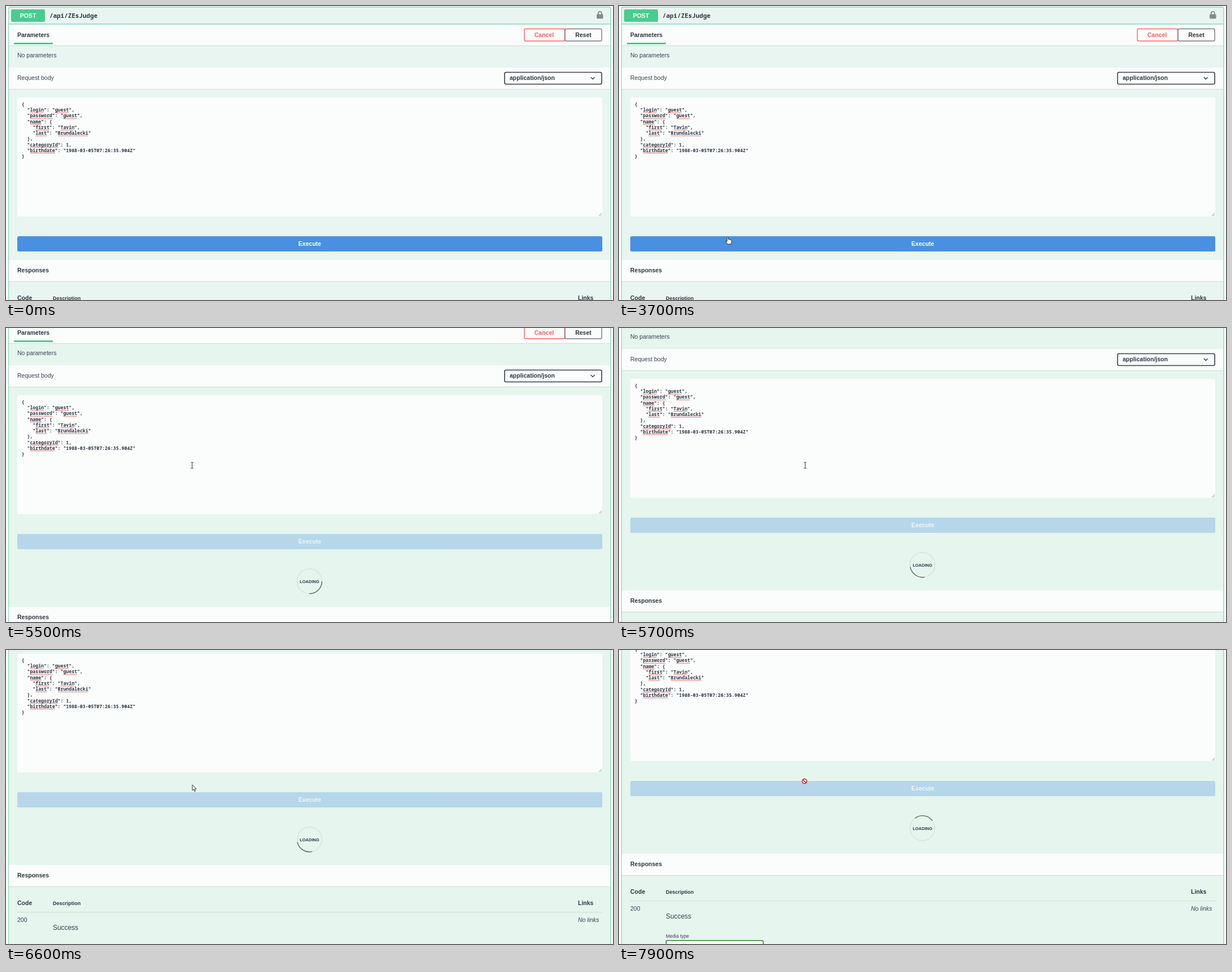
An HTML page for the animation above (8 s loop, 1075 px wide and 521 px high).

```html
<!DOCTYPE html>
<html lang="en">
<head>
<meta charset="utf-8">
<title>API console</title>
<style>
  html, body { margin: 0; width: 100%; height: 100%; overflow: hidden; background: #fff; }
  svg { display: block; width: 1075px; height: 521px; }
  text { font: 10.5px "Liberation Sans", Arial, sans-serif; fill: #3b4151; white-space: pre; }
  .b { font-weight: 700; fill: #303644; }
  .mid { text-anchor: middle; }
  .mono { font-family: "Noto Sans Mono", "DejaVu Sans Mono", monospace; font-weight: 600; fill: #303644; }
  .white { fill: #fff; }
  .panel { fill: #fafdfc; }
  .rule { stroke: #d0dad6; fill: none; }
  .edge { stroke: #8cdabb; stroke-width: 1.4; fill: none; }
  .wave { stroke: #e23a3a; stroke-width: .9; fill: none; }
</style>
</head>
<body>
<svg viewBox="0 0 1075 521">
  <g id="page">
    <rect id="back" x="4.5" y="2" width="1066.5" height="1000" rx="3"/>
    <rect class="panel" x="5" y="33" width="1065" height="37"/>
    <path class="rule" d="M5 70.5H1070"/>
    <rect class="edge" x="4.5" y="2" width="1066.5" height="1000" rx="3"/>
    <path class="edge" d="M5 32H1071"/>
    <rect x="9" y="6" width="60" height="22" rx="2.5" fill="#49cc90"/>
    <text class="b mid white" x="39" y="20.5">POST</text>
    <text class="mono" x="77" y="21" style="font-size:10.9px">/api/ZEsJudge</text>
    <rect x="1046" y="14.5" width="11.5" height="8" rx="1.4" fill="#858b89"/>
    <path d="M1048.8 15v-2.2a3 3 0 0 1 6 0v2.2" fill="none" stroke="#858b89" stroke-width="1.7"/>

    <text class="b" x="20" y="54.5">Parameters</text>
    <rect x="14" y="65" width="69" height="3" fill="#49cc90"/>
    <rect x="918" y="40.5" width="71.5" height="21.5" rx="2" fill="none" stroke="#ff6060" stroke-width="1.4"/>
    <text class="b mid" x="953" y="54.5" style="fill:#f95b5b">Cancel</text>
    <rect x="990" y="40.5" width="65" height="21.5" rx="2" fill="none" stroke="#767c84" stroke-width="1.4"/>
    <text class="b mid" x="1022.5" y="54.5">Reset</text>
    <text x="20" y="90.8">No parameters</text>

    <rect class="panel" x="5" y="109" width="1065" height="38"/>
    <path class="rule" d="M5 147.5H1070"/>
    <text x="20" y="131">Request body</text>
    <rect class="panel" x="883" y="117.5" width="172" height="21" rx="2.5" stroke="#363c4a" stroke-width="1.6"/>
    <text class="b" x="892" y="131">application/json</text>
    <path d="M1035.8 126.2l3.4 3.3 3.4-3.3" fill="none" stroke="#303644" stroke-width="1.4"/>

    <rect class="panel" x="20" y="162" width="1036" height="211" rx="2.5"/>
    <path d="M1050 372l5-5M1053 372l2-2" stroke="#858b89" stroke-width=".9"/>
    <g id="json"></g>

    <g id="run">
      <rect x="20" y="408" width="1036" height="27" rx="2.5" fill="#4990e2"/>
      <text class="b mid white" x="538" y="425">Execute</text>
    </g>

    <g id="load">
      <circle cx="537.5" cy="491.7" r="22" fill="none" stroke="#d6e4de" stroke-width="1.4"/>
      <path id="arc" d="M521.94 476.14a22 22 0 0 1 31.12 0" fill="none" stroke="#5c6763" stroke-width="1.4"/>
      <text class="b mid" x="537.5" y="494.5" style="font-size:7.5px">LOADING</text>
    </g>

    <g id="resp">
      <rect class="panel" x="5" y="450" width="1065" height="38"/>
      <path class="rule" d="M5 488.3H1070"/>
      <text class="b" x="20" y="472">Responses</text>
      <text class="b" x="20" y="521">Code</text>
      <text class="b" x="83" y="521" style="font-size:8.95px">Description</text>
      <text class="b" x="1013" y="521">Links</text>
      <path class="rule" d="M20 533.7H1056"/>
      <text x="20" y="551">200</text>
      <text x="1013" y="551" font-style="italic" style="font-style:italic">No links</text>
      <text x="83" y="564.5" style="font-size:11.9px">Success</text>
      <text x="83" y="599.3" style="font-size:8.4px">Media type</text>
      <rect class="panel" x="83.5" y="603.7" width="172" height="21" rx="2.5" stroke="#2c8a2c" stroke-width="1.6"/>
    </g>
  </g>

  <g id="cursor">
    <path id="arrow" d="M0 0V10.2L2.4 8 4 11.8 5.6 11.1 4 7.4H7.1Z" fill="#fff" stroke="#222" stroke-width=".9"/>
    <path id="beam" d="M-2.3-.8H-.6L0-.3.6-.8H2.3M0-.3V9.3M-2.3 9.8H-.6L0 9.3.6 9.8H2.3" fill="none" stroke="#333" stroke-width="1"/>
    <path id="hand" d="M-1 1Q0-.6 1 1V5L6 6Q7 6.3 7 7.5V10L5.5 13.5H-.5L-3.3 8.6Q-3.4 7.3-2.3 7.6L-1 8.8Z" fill="#fff" stroke="#222" stroke-width=".9"/>
    <g id="no" fill="#fff" stroke="#dd1111" stroke-width="1.5">
      <circle r="4.1"/><path d="M-2.9-2.9L2.9 2.9"/>
    </g>
  </g>
</svg>
<script>
const LOOP = 8000, STEP = 100, CLICK = 4300;
const $ = id => document.getElementById(id);
const set = (id, attrs) => {
  for (const k in attrs) $(id).setAttribute(k, attrs[k]);
};

const body = `{
  "login": "guest",
  "password": "guest",
  "name": {
    "first": "Tavin",
    "last": "Brundalecki"
  },
  "categoryId": 1,
  "birthdate": "1988-03-05T07:26:35.904Z"
}`;

// JSON text with a spelling mark under every quoted word
function buildJson() {
  const size = 8.2, cell = size * .6, left = 27.7;
  let out = '';
  body.split('\n').forEach((line, i) => {
    const y = 177 + i * 10.22;
    const indent = line.search(/\S/);
    out += `<text class="mono" style="font-size:${size}px" x="${left + indent * cell}" y="${y}">${line.trim()}</text>`;
    for (const m of line.matchAll(/"([A-Za-z]+)"/g)) {
      const n = Math.round(m[1].length * cell / 2);
      out += `<path class="wave" d="M${left + (m.index + 1) * cell} ${y + 2.4}${'l1-.9 1 .9'.repeat(n)}"/>`;
    }
  });
  $('json').innerHTML = out;
}

// Rows of [time, ...values], linear in between
function track(rows, t) {
  const i = rows.findIndex(r => r[0] > t);
  if (i === 0) return rows[0].slice(1);
  if (i < 0) return rows[rows.length - 1].slice(1);
  const a = rows[i - 1], b = rows[i], k = (t - a[0]) / (b[0] - a[0]);
  return a.slice(1).map((v, j) => v + (b[j + 1] - v) * k);
}

const scrollKeys = [[5200, 0], [5700, 72], [6200, 93], [6600, 156], [7800, 176]];
const mouseKeys = [
  [100, 1043.5, 46.5], [1900, 1043.5, 46.5], [2000, 935.5, 75.5],
  [2400, 560, 180], [2800, 159, 299.5], [3500, 195, 414], [3600, 195, 414],
  [3700, 192.5, 408.5], [4200, 192.5, 408.5], [4900, 329.5, 239],
  [6600, 330, 238.8], [7800, 328.5, 232.6]
];

function pointer(x, y, busy) {
  const over = (l, t, r, b) => x >= l && x <= r && y >= t && y <= b;
  if (over(20, 162, 1056, 372)) return 'beam';
  if (over(20, 408, 1056, 435)) return busy ? 'no' : 'hand';
  if (over(918, 40, 1055, 62)) return 'hand';
  return 'arrow';
}

function draw(t) {
  const busy = t >= CLICK;
  const scroll = Math.round(track(scrollKeys, t)[0]);
  const [x, y] = track(mouseKeys, t);
  const fade = Math.min(1, (t - CLICK + STEP) / 300);

  set('page', { transform: `translate(0 ${-scroll})` });
  set('back', { fill: busy ? '#e6f5ee' : '#e8f5f0' });
  set('run', { opacity: busy ? 1 - .7 * fade : 1 });
  set('load', { opacity: busy ? fade : 0 });
  set('arc', { transform: `rotate(${297 + .397 * (t - 5000)} 537.5 491.7)` });
  set('resp', { transform: `translate(0 ${busy ? 87 : 0})` });

  const kind = pointer(x, y + scroll, busy);
  for (const id of ['arrow', 'beam', 'hand', 'no'])
    set(id, { visibility: t >= 100 && id === kind ? 'visible' : 'hidden' });
  set('cursor', { transform: `translate(${x} ${y})` });
}

buildJson();
const start = performance.now();
function tick() {
  const t = (performance.now() - start) % LOOP;
  draw(Math.floor(t / STEP) * STEP);
  requestAnimationFrame(tick);
}
tick();
</script>
</body>
</html>
```
